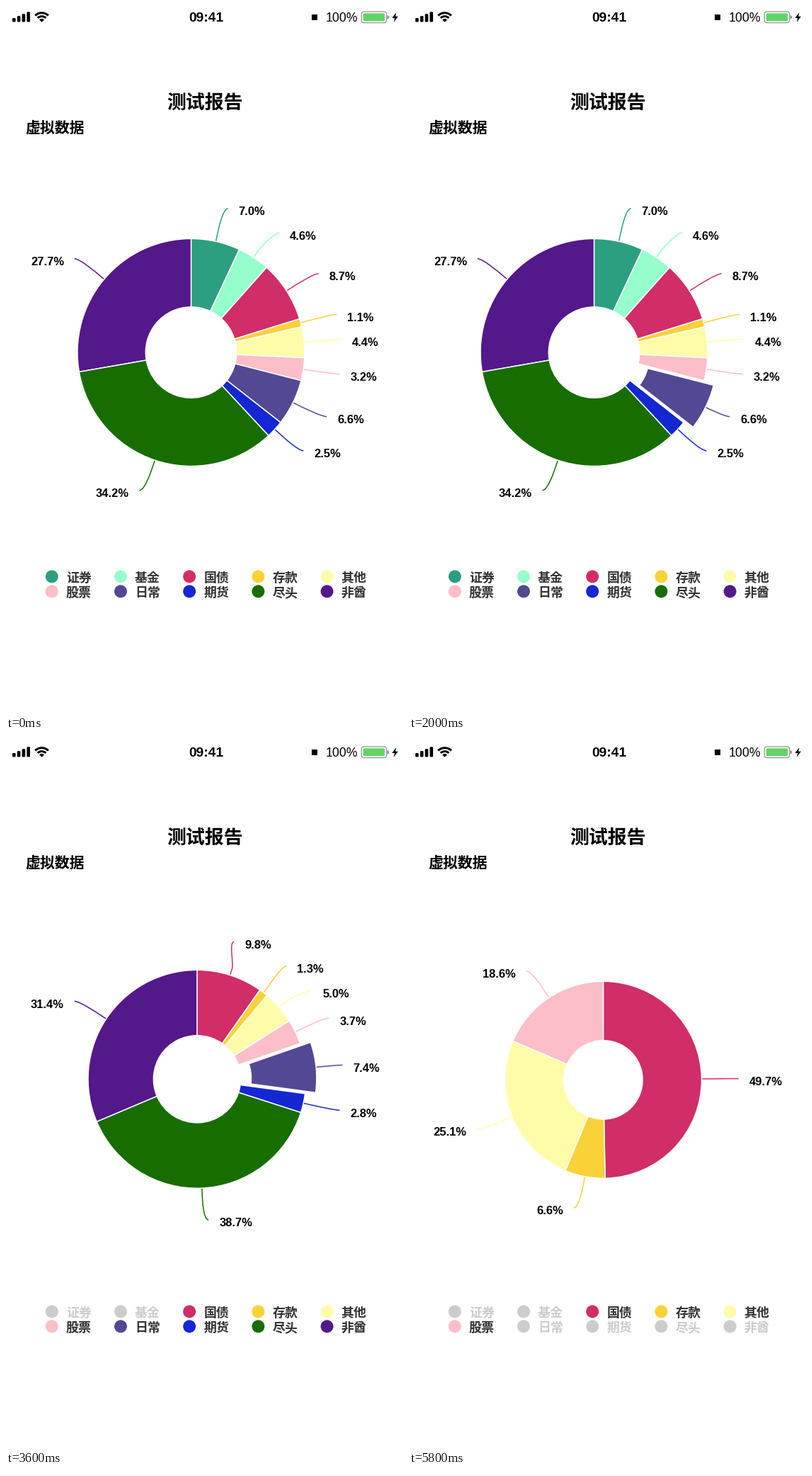
Recreate the animation shown at these times as a matplotlib script. Size 561x998 px, loop 6 s.

```python
import numpy as np
import matplotlib.pyplot as plt
from matplotlib.animation import FuncAnimation
from matplotlib.patches import (Circle, FancyBboxPatch, PathPatch, Polygon,
                                Rectangle, Wedge)
from matplotlib.path import Path

W, H, DPI = 561, 998, 64
PT = 72 / DPI            # points per pixel
S = W / 375              # screen scale
STEP, LOOP, DUR = 200, 6000, 380

CJK, SANS = "Noto Sans CJK JP", "Liberation Sans"
ITEMS = [
    ("证券", 67, "#2b9f7f"), ("基金", 44, "#96ffcb"), ("国债", 83, "#d12d68"),
    ("存款", 11, "#f9d237"), ("其他", 42, "#fffca9"), ("股票", 31, "#fcbec8"),
    ("日常", 63, "#534894"), ("期货", 24, "#1427d2"), ("尽头", 328, "#176d00"),
    ("非酋", 266, "#53188a"),
]
NAMES = [item[0] for item in ITEMS]
DAILY, LAST = NAMES.index("日常"), NAMES.index("非酋")

# start time, newly hidden item, centre x, centre y, radius
TOGGLES = [
    (-1000, None, 261.5, 489, 160.5),
    (2050, "基金", 264.5, 482.1, 157.3),
    (2900, "证券", 270, 477.3, 154),
    (3650, "尽头", 287, 479, 138.3),
    (4220, "日常", 284, 482, 141),
    (4610, "期货", 280.3, 484.5, 143.5),
    (5250, "非酋", 274.5, 478.3, 139),
]
POP_LAST, POP_DAILY = 500, 1500


def ease(t, start, dur=DUR):
    p = np.clip((t - start) / dur, 0, 1)
    return (1 - np.cos(np.pi * p)) / 2


def polar(cx, cy, r, a):
    return np.array([cx + r * np.sin(a), cy - r * np.cos(a)])


def spread(ys, gap=23 * S):
    """Push sorted label positions apart to at least one gap."""
    blocks = []
    for y in ys:
        blocks.append([y, 1])
        while len(blocks) > 1:
            (y0, n0), (y1, n1) = blocks[-2:]
            if y1 - y0 >= gap * (n0 + n1) / 2:
                break
            total = n0 + n1
            blocks[-2:] = [[(y0 * n0 + y1 * n1) / total, total]]
    return [y + (k - (n - 1) / 2) * gap for y, n in blocks for k in range(n)]


def layout(hidden, cx, cy, r):
    """Slice angles, label texts and connector points of one chart state."""
    shown = [i for i, name in enumerate(NAMES) if name not in hidden]
    total = sum(ITEMS[i][1] for i in shown)
    reach = r + 30 * S
    arcs, spots, done = {}, {}, 0
    for i in shown:
        value = ITEMS[i][1]
        arcs[i] = np.array([done, done + value]) / total * 2 * np.pi
        done += value
        spots[i] = polar(cx, cy, reach, arcs[i].mean())
    out = {}
    for side in (1, -1):
        group = [i for i in shown if (arcs[i].mean() < np.pi) == (side > 0)]
        group.sort(key=lambda i: spots[i][1])
        for i, y in zip(group, spread([spots[i][1] for i in group])):
            at_pole = abs(y - cy) > reach - 2 * S
            dy = (spots[i][1] if at_pole else y) - cy
            x = cx + side * np.sqrt(max(reach**2 - dy**2, 0))
            mid = arcs[i].mean()
            knee, edge = polar(cx, cy, r + 6 * S, mid), polar(cx, cy, r, mid)
            line = np.array([(x + side * 5 * S, y), (x, y),
                             2 * knee - edge, knee, edge])
            text = f"{100 * ITEMS[i][1] / total:.1f}%"
            out[i] = (np.array([cx, cy, r]), arcs[i], line, text, side)
    return out


states, gone = [], set()
for start, name, *geo in TOGGLES:
    gone = gone | {name}
    states.append((start, gone, layout(gone, *geo)))

fig = plt.figure(figsize=(W / DPI, H / DPI), dpi=DPI, facecolor="white")
ax = fig.add_axes([0, 0, 1, 1])
ax.set_xlim(0, W)
ax.set_ylim(H, 0)
ax.axis("off")
live = []


def text(x, y, s, size, font=CJK, weight="bold", color="black", ha="left", **kw):
    return ax.text(x, y, s, fontsize=size * PT, family=font, weight=weight,
                   color=color, ha=ha, va="baseline", **kw)


def fill(patch, color="black"):
    patch.set(facecolor=color, edgecolor="none")
    return ax.add_patch(patch)


def rounded(x, y, w, h, r, **kw):
    box = FancyBboxPatch((x, y), w, h, boxstyle=f"round,pad=0,rounding_size={r}", **kw)
    return ax.add_patch(box)


def draw_status():
    for k in range(4):
        h = 5.5 + 2.9 * k
        rounded(9 + 6.8 * k, 22.5 - h, 4.6, h, 1.2, fc="black", ec="none")
    for outer, inner in ((14.6, 11.6), (9.7, 6.7), (4.8, 0)):
        fill(Wedge((50.5, 22.8), outer, 225, 315, width=outer - inner))
    text(283, 22.3, "09:41", 19.3, SANS, ha="center")
    fill(Rectangle((432, 12), 8, 8))
    text(452, 22.2, "100%", 17.7, SANS, "normal")
    rounded(502.3, 8, 35.4, 15.6, 3.5, fc="none", ec="#8e8e8e", lw=1.2 * PT)
    rounded(504.7, 10.3, 30.6, 11, 1.5, fc="#62d466", ec="none")
    fill(Wedge((538.6, 15.8), 2.6, -90, 90), "#8e8e8e")
    fill(Polygon([(551.5, 9), (545.5, 17), (549.3, 17),
                  (547.8, 23), (554, 14.7), (550.2, 14.7)]))


def draw_legend():
    rows = []
    for i, (name, _, color) in enumerate(ITEMS):
        x, y = 64.8 + 97.2 * (i % 5), 805.4 + 14 * S * (i // 5)
        dot = fill(Circle((x, y), 6 * S), color)
        rows.append((dot, text(x + 20, y + 7.6, name, 12 * S, color="#333333")))
    return rows


def draw_tooltip(alpha):
    color = ITEMS[LAST][2]
    box = (146.5, 303.5, 133, 66)
    for width, shade in ((7.5, .05), (4.5, .1), (1.5, .15)):
        live.append(rounded(box[0] + 1.5, box[1] + 1.5, *box[2:], 3, fc="none",
                            ec="black", lw=width * PT, alpha=shade * alpha, zorder=5))
    live.append(rounded(*box, 3, fc="#f7f7f7", ec="none", alpha=.85 * alpha, zorder=6))
    live.append(rounded(*box, 3, fc="none", ec=color, lw=1.5 * PT,
                        alpha=alpha, zorder=6))
    dot = fill(Circle((163, 350), 4.2), color)
    dot.set(alpha=alpha, zorder=7)
    style = dict(color="#333333", alpha=alpha, zorder=7)
    live.extend([
        dot,
        text(157, 333, "非酋", 10 * S, weight="normal", **style),
        text(173, 355.3, "数量值", 12 * S, weight="normal", **style),
        text(227, 355.3, ":", 12 * S, SANS, "normal", **style),
        text(237, 355.3, "266", 12 * S, SANS, **style),
    ])


def draw_slice(i, geo, arc, line, label, side, pop):
    color = ITEMS[i][2]
    path = Path(line, [Path.MOVETO] + [Path.CURVE4] * 3 + [Path.LINETO])
    live.append(ax.add_patch(PathPatch(path, fc="none", ec=color, lw=S * PT, zorder=2)))
    cx, cy, r = geo
    centre = polar(cx, cy, 10 * S * pop, arc.mean())
    a0, a1 = np.degrees(arc) - 90
    live.append(ax.add_patch(Wedge(centre, r, a0, a1, width=.6 * r, fc=color,
                                   ec="white", lw=S * PT, zorder=3 + (pop > 0) * .5)))
    x, y = line[0]
    live.append(text(x + side * 10 * S, y + 9.4, label, 11 * S, SANS,
                     ha="left" if side > 0 else "right", zorder=4))


draw_status()
text(W / 2 + .8, 145.2, "测试报告", 18 * S, ha="center")
text(27.7, 179, "虚拟数据", 14 * S)
legend = draw_legend()


def update(n):
    t = n * STEP
    while live:
        live.pop().remove()
    k = max(j for j, state in enumerate(states) if state[0] < t)
    start, hidden, now = states[k]
    before = states[max(k - 1, 0)][2]
    p = ease(t, start)
    pops = {LAST: ease(t, POP_LAST) - ease(t, POP_DAILY), DAILY: ease(t, POP_DAILY)}
    for i, (geo, arc, line, label, side) in now.items():
        old = before[i]
        mix = [a + (b - a) * p for a, b in zip(old[:3], (geo, arc, line))]
        draw_slice(i, *mix, label, side, pops.get(i, 0))
    for (dot, caption), (name, _, color) in zip(legend, ITEMS):
        off = name in hidden
        dot.set_facecolor("#cccccc" if off else color)
        caption.set_color("#cccccc" if off else "#333333")
    alpha = ease(t, POP_LAST, 200) - ease(t, POP_DAILY, 200)
    if alpha > 0.01:
        draw_tooltip(alpha)
    return live


anim = FuncAnimation(fig, update, frames=LOOP // STEP, interval=STEP,
                     init_func=lambda: update(0), repeat=True, repeat_delay=0)
plt.show()
```
